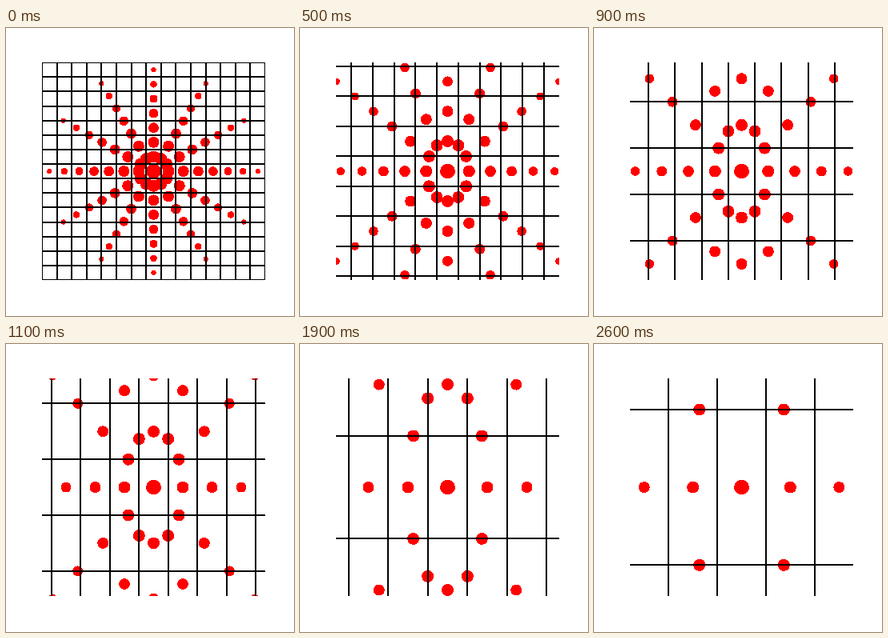
Write a matplotlib script that moves like this. It is 360 px wide and 360 px high and loops after 2700 ms.

```python
import numpy as np
import matplotlib.pyplot as plt
from matplotlib.animation import FuncAnimation
from matplotlib.collections import LineCollection

FRAMES = 27
INTERVAL = 100
HALF = 7.5          # half width of the view, in cells
RINGS = 7
GROWTH = 0.0875     # horizontal stretch gained per step

plt.rcParams["toolbar"] = "None"
fig = plt.figure(figsize=(5, 5), dpi=72, facecolor="white")
ax = fig.add_axes([0.125, 0.125, 0.775, 0.755])
ax.set_xlim(-HALF, HALF)
ax.set_ylim(-HALF, HALF)
ax.axis("off")

# Twelve rays of dots around a larger centre dot
ring, angle = np.meshgrid(np.arange(1, RINGS + 1), np.radians(np.arange(0, 360, 30)))
ring, angle = ring.ravel(), angle.ravel()
dots = np.column_stack([ring * np.cos(angle), ring * np.sin(angle)])
dots = np.vstack([[0, 0], dots])
radii = np.append(8.8, 2.6 * np.sqrt(RINGS + 1 - ring))

points = ax.scatter(dots[:, 0], dots[:, 1], s=(2 * radii) ** 2, c="red",
                    linewidths=0, antialiased=False, zorder=1)
grid = LineCollection([], colors="black", linewidths=2, capstyle="butt",
                      antialiased=False, zorder=2)
ax.add_collection(grid, autolim=False)

ticks = np.arange(-HALF, HALF + 1)


def visible(scale):
    pos = ticks * scale
    return pos[np.abs(pos) <= HALF + 1e-9]


def draw(i):
    sx = 1 + GROWTH * i
    sy = sx ** 2        # vertical stretch grows quadratically
    points.set_offsets(dots * [sx, sy])
    columns = [[(x, -HALF), (x, HALF)] for x in visible(sx)]
    rows = [[(-HALF, y), (HALF, y)] for y in visible(sy)]
    grid.set_segments(columns + rows)
    return points, grid


anim = FuncAnimation(fig, draw, frames=FRAMES, interval=INTERVAL,
                     init_func=lambda: draw(0), repeat=True)
plt.show()
```
